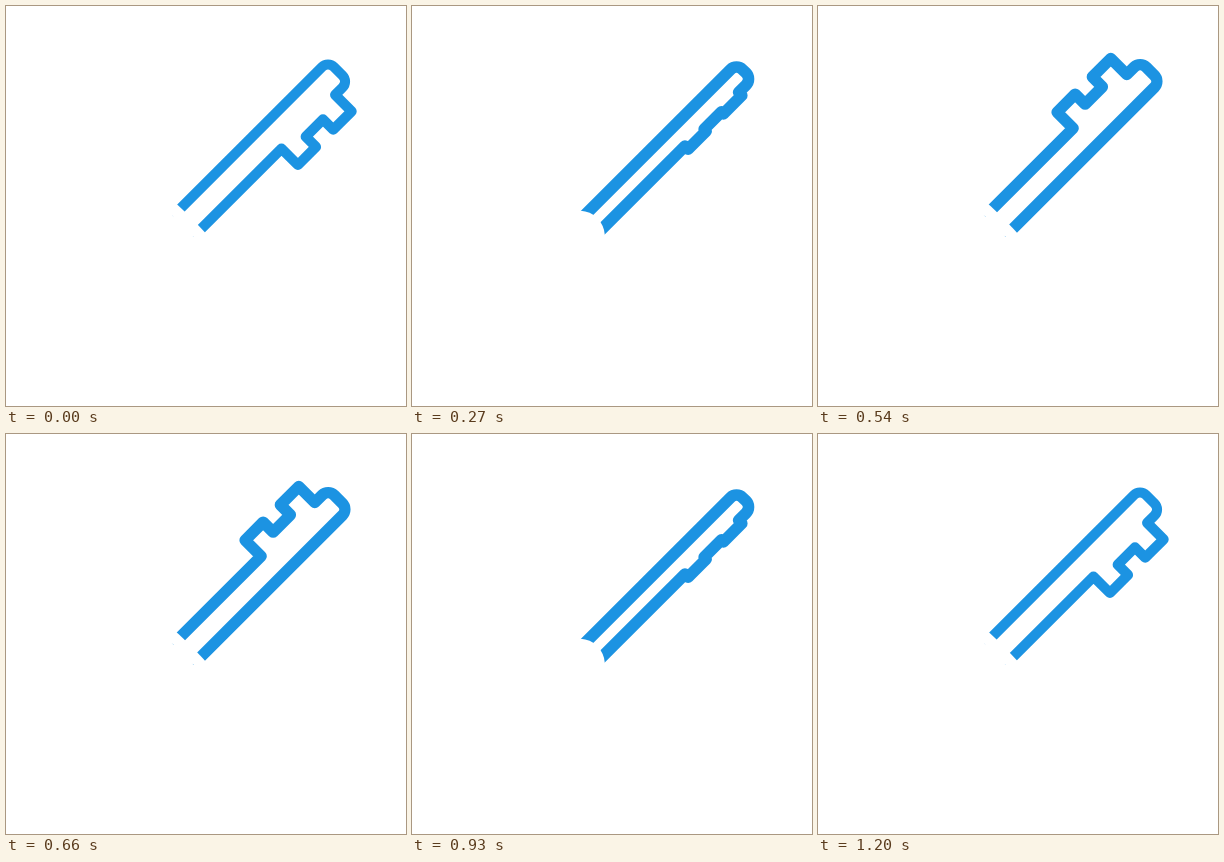
An HTML page that plays this animation: 400 by 400 pixels, repeating every 1260 ms.

```html
<!DOCTYPE html>
<html lang="en">
<head>
<meta charset="utf-8">
<title>Turning key</title>
<style>
  html, body { margin: 0; width: 100%; height: 100%; overflow: hidden; background: #fff; }
  svg { display: block; width: 100vw; height: 100vh; }
</style>
</head>
<body>
<svg viewBox="0 0 400 400">
  <!-- x runs along the shaft, y across it -->
  <g transform="translate(198.75 198.75) rotate(-45)">
    <path id="shaft" fill="none" stroke="#1c93e2" stroke-linejoin="round"/>
    <ellipse id="cover" cx="-41" rx="22" fill="#fff"/>
    <path id="ends" fill="none" stroke="#1c93e2"/>
  </g>
</svg>
<script>
  const LOOP = 1260, STEP = 30, STEPS = 40;
  const TIP = 188.8, TAIL = -28.5, CORNER = 8.5;
  const TOOTH = 23.3, NOTCH = 8.8;
  // [position along the shaft, depth beyond its edge]
  const TEETH = [
    [169.9, 0], [169.9, TOOTH], [143.9, TOOTH], [143.9, NOTCH],
    [119.5, NOTCH], [119.5, TOOTH], [94, TOOTH], [94, 0]
  ];

  const el = id => document.getElementById(id);
  const shaft = el('shaft'), cover = el('cover'), ends = el('ends');

  function set(node, attrs) {
    for (const name in attrs) node.setAttribute(name, attrs[name]);
  }

  function shaftPath(half, side, depth) {
    const y = half * side;
    const sweep = side > 0 ? 1 : 0;
    const arc = (x, v) => `A${CORNER} ${CORNER} 0 0 ${sweep} ${x} ${v}`;
    const inner = (half - CORNER) * side;
    const teeth = TEETH.map(([x, d]) => `L${x} ${(half + d * depth) * side}`).join('');
    return `M${TAIL} ${-y}H${TIP - CORNER}${arc(TIP, -inner)}V${inner}` +
      `${arc(TIP - CORNER, y)}${teeth}H${TAIL}`;
  }

  function draw(time) {
    const step = Math.min(STEPS, Math.floor((time % LOOP) / STEP));
    const angle = step / STEPS * 2 * Math.PI;
    const cos = Math.cos(angle);
    const side = cos < 0 ? -1 : 1;
    const turn = Math.abs(cos);
    const edge = Math.abs(Math.sin(angle));
    const half = 10.3 + 4.2 * turn;
    const depth = turn * (1 + 0.22 * edge * edge);

    // the side walls thicken the line as the key turns
    set(shaft, {
      d: shaftPath(half, side, depth),
      'stroke-width': 10.2 + edge + 3.2 * edge * turn
    });
    set(cover, { ry: 22 / (1 - 0.8 * Math.pow(turn, 1.2)) });

    // slivers of the shaft that show behind the cover
    const show = turn < 0.3 ? 0 : Math.max(0, 1 - Math.abs(turn - 0.588) / 0.5);
    const reach = 2.5 * show;
    const sliver = y => `M-30.5 ${y - reach}V${y + reach}`;
    set(ends, { d: sliver(-half) + sliver(half), 'stroke-width': 1.2 * show });
  }

  const start = performance.now();
  function tick() {
    draw(performance.now() - start);
    requestAnimationFrame(tick);
  }
  draw(0);
  requestAnimationFrame(tick);
</script>
</body>
</html>
```
